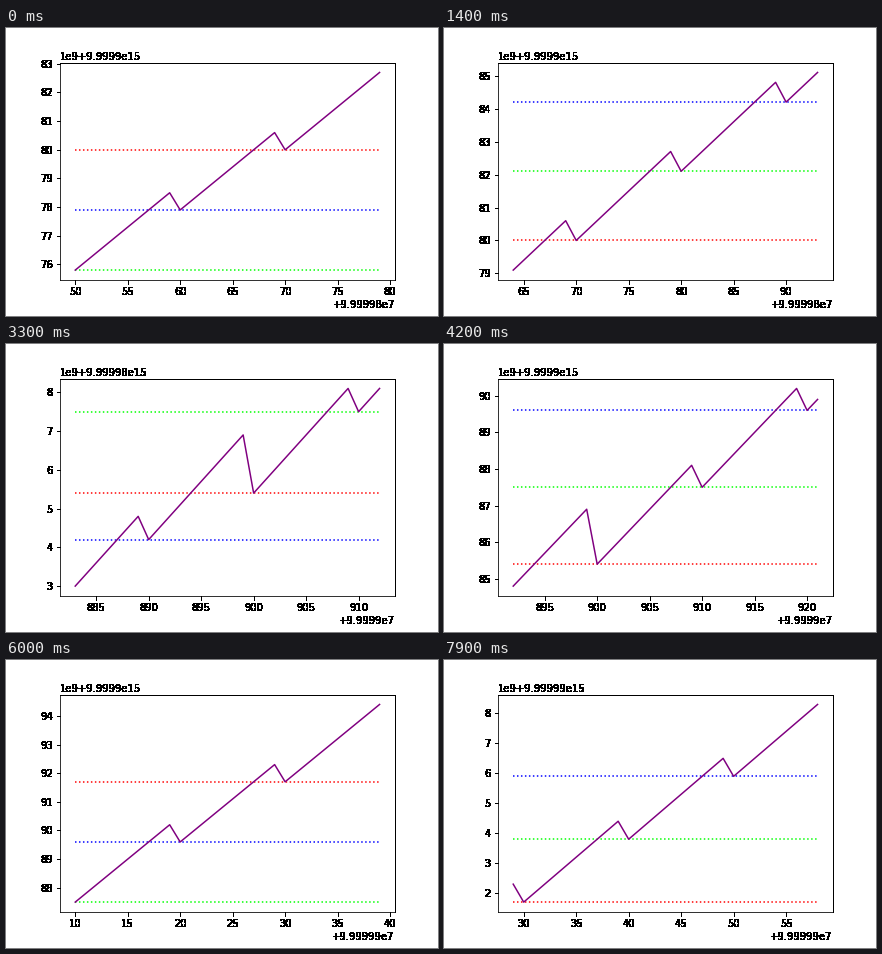
These frames come from a looping animation (432x288 px, 8 s). A matplotlib script:

```python
import numpy as np
import matplotlib.pyplot as plt
from matplotlib.animation import FuncAnimation

START, WINDOW, FRAMES = 99999850, 30, 80
COLORS = ["red", "lime", "blue"]


def value(x):
    """x^2 + S(x) * x, where S is the digit sum."""
    return x * x + sum(map(int, str(x))) * x


def harden(img, dpi):
    """Turn every touched pixel solid black, for crisp heavy text."""
    img[..., :3] = 0
    img[..., 3] = img[..., 3] > 0
    return img, 0, 0


plt.rcParams.update({"font.family": "DejaVu Sans", "font.size": 10})
fig, ax = plt.subplots(figsize=(6, 4), dpi=72)
fig.subplots_adjust(left=0.125, right=0.9, bottom=0.125, top=0.88)
for part in (ax.xaxis, ax.yaxis, ax.spines["right"], ax.spines["top"]):
    part.set_agg_filter(harden)

levels = [ax.plot([], [], ":", color=c)[0] for c in COLORS]
curve, = ax.plot([], [], color="purple")


def update(i):
    xs = range(START + i, START + i + WINDOW)
    curve.set_data(np.array(xs, float), np.array([value(x) for x in xs], float))
    for x in xs:
        if x % 10 == 0:
            levels[x // 10 % 3].set_data(np.array(xs, float),
                                         np.full(WINDOW, float(value(x))))
    ax.relim()
    ax.autoscale_view()
    return [curve, *levels]


anim = FuncAnimation(fig, update, frames=FRAMES, init_func=lambda: update(0),
                     interval=100, repeat=True, blit=False)
plt.show()
```
